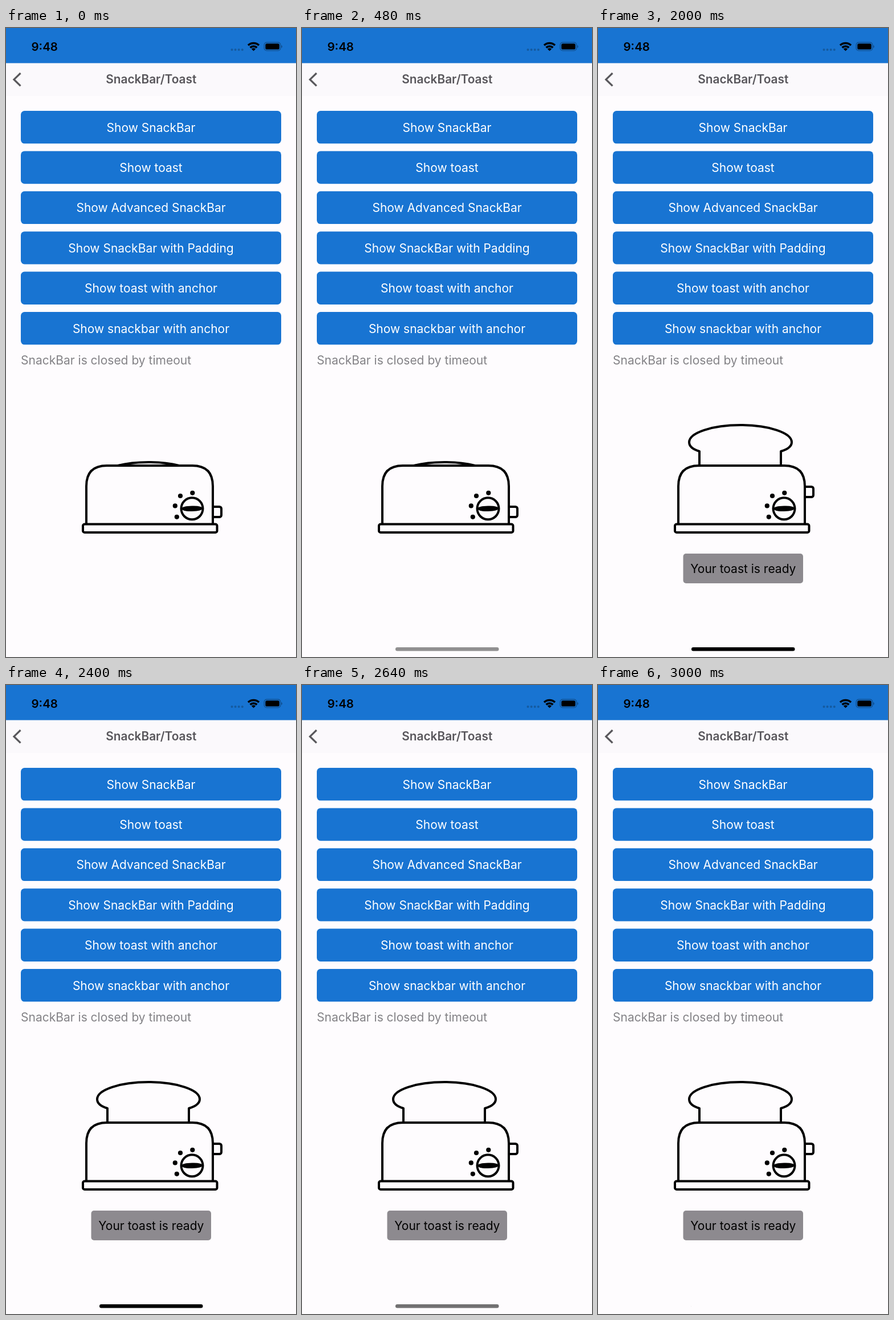
Animation, 509 px wide and 1101 px high, one loop 5000 ms. Source, as an HTML page:

```html
<!DOCTYPE html>
<html lang="en">
<head>
<meta charset="utf-8">
<title>Toast demo</title>
<style>
  html, body { margin: 0; width: 100%; height: 100%; overflow: hidden; background: #fefcfe; }
  svg { display: block; width: 100%; height: 100%; }
  text { font: 21px Inter, sans-serif; }
  .bold { font-weight: 600; }
  .mid { text-anchor: middle; }
  .line { fill: #fefcfe; stroke: #000; stroke-width: 4; stroke-linejoin: round; }
</style>
</head>
<body>
<svg viewBox="0 0 509 1101">
  <rect width="509" height="1101" fill="#fefcfe"/>
  <rect y="61" width="509" height="58" fill="#fbf9fc"/>
  <rect width="509" height="61.5" fill="#1874d2"/>

  <!-- Status bar -->
  <text class="bold" x="44.5" y="39.5" style="font-size:20.5px">9:48</text>
  <path d="M396.5 38h20" stroke="#145a9f" stroke-width="4" stroke-linecap="round" stroke-dasharray="0 6.1"/>
  <g fill="none" stroke="#000" stroke-width="3.6">
    <path d="M425 30.3a13.8 13.8 0 0 1 19 0M428.6 34.4a8.6 8.6 0 0 1 11.8 0"/>
  </g>
  <path d="M434.5 40.3l-3.6-3.6a5.2 5.2 0 0 1 7.2 0z"/>
  <rect x="453.2" y="25.2" width="28.6" height="14.4" rx="4.4" fill="none" stroke="#11508f" stroke-width="1.4"/>
  <rect x="455.3" y="27.2" width="24.5" height="10.4" rx="2.6"/>
  <path d="M483.2 30v5q1.8-.8 1.8-2.5t-1.8-2.5z" fill="#11508f"/>

  <!-- Title bar -->
  <path d="M25.5 79L14 90.2l11.5 11.2" fill="none" stroke="#58575b" stroke-width="3.2"/>
  <text class="bold mid" x="254.8" y="97.3" fill="#58565b" style="font-size:20.8px">SnackBar/Toast</text>

  <g id="buttons"></g>
  <text x="26" y="588.5" fill="#838286">SnackBar is closed by timeout</text>

  <!-- Toaster -->
  <path id="bread" class="line" d="M178 780V741C168 738 160 733 160 725A90 30 0 0 1 340 725C340 733 331 738 321 741V780"/>
  <rect id="lever" class="line" x="352" y="838" width="26" height="18" rx="3.5"/>
  <path class="line" d="M141 869V802Q141 766 177 766H327Q363 766 363 802V869"/>
  <rect class="line" x="135" y="868.5" width="235.5" height="14.5" rx="3"/>
  <circle class="line" cx="326.5" cy="841.3" r="19"/>
  <path d="M308 841Q309 837 326.5 836.5T345 841Q344 845.5 326.5 846T308 841"/>
  <g>
    <circle cx="306" cy="819" r="4.1"/>
    <circle cx="327.3" cy="813.8" r="4.1"/>
    <circle cx="296.8" cy="836.4" r="4.1"/>
    <circle cx="299.8" cy="855.8" r="4.1"/>
  </g>

  <g id="toast">
    <rect x="149.5" y="920" width="210.5" height="52" rx="5" fill="#8d8a8f"/>
    <text class="mid" x="254.8" y="953.7">Your toast is ready</text>
  </g>
  <rect id="homeBar" x="164" y="1084" width="181.5" height="6.4" rx="3.2"/>
</svg>
<script>
  const LOOP = 5000, TICK = 40, POP = 2000;
  const get = id => document.getElementById(id);
  const clamp = v => Math.min(1, Math.max(0, v));
  const smooth = p => p * p * (3 - 2 * p);

  const labels = ['Show SnackBar', 'Show toast', 'Show Advanced SnackBar',
    'Show SnackBar with Padding', 'Show toast with anchor', 'Show snackbar with anchor'];
  get('buttons').innerHTML = labels.map((label, i) => `
    <g transform="translate(26 ${145 + i * 70.4})" fill="#fff">
      <rect width="457" height="57.3" rx="6.5" fill="#1874d2"/>
      <text class="mid" x="228.5" y="36.5">${label}</text>
    </g>`).join('');

  const bread = get('bread'), lever = get('lever'), toast = get('toast'), homeBar = get('homeBar');
  const start = performance.now();

  function draw(now) {
    const time = Math.max(0, now - start) % LOOP;
    const tick = Math.floor(time / TICK) * TICK;
    const popped = time >= POP;
    bread.setAttribute('transform', `translate(0 ${popped ? 0 : 65})`);
    lever.setAttribute('transform', `translate(0 ${popped ? -35 : 0})`);
    toast.setAttribute('visibility', popped ? 'visible' : 'hidden');

    const fadeIn = clamp((tick - 240) / 400) ** 1.65;
    const fadeOut = smooth(clamp((tick - 2360) / 600));
    homeBar.setAttribute('opacity', fadeIn * (1 - fadeOut));
    requestAnimationFrame(draw);
  }
  draw(start);
</script>
</body>
</html>
```
